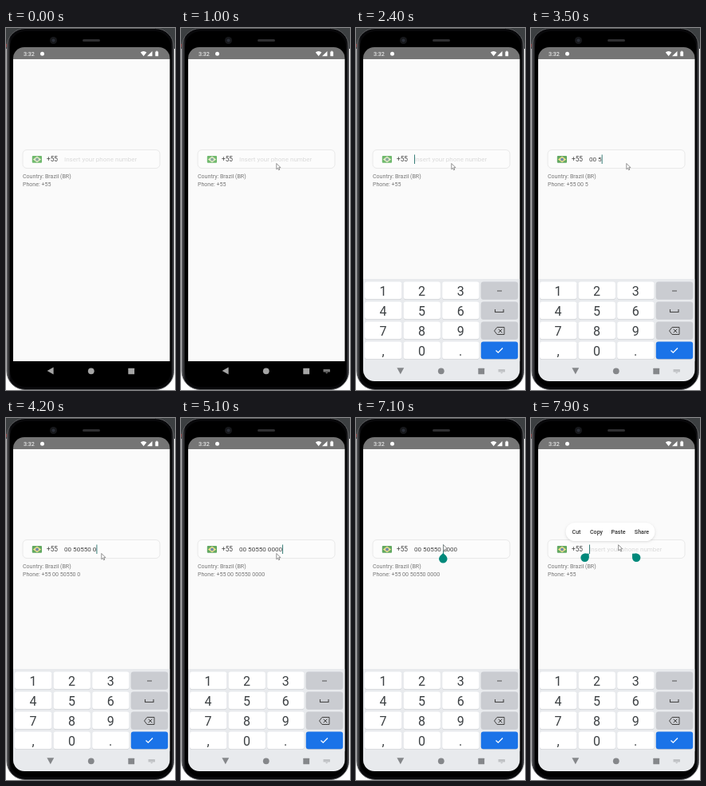
An HTML page with a canvas that plays this animation: 212 by 453 pixels, repeating every 8000 ms.

```html
<!DOCTYPE html>
<html lang="en">
<head>
<meta charset="utf-8">
<title>Phone number input</title>
<style>
  html, body { margin: 0; width: 100%; height: 100%; overflow: hidden; background: #fff; }
  canvas { display: block; width: 212px; height: 453px; }
</style>
</head>
<body>
<canvas id="stage"></canvas>
<script>
const W = 212, H = 453, LOOP = 8000, STEP = 100;
const SCREEN = { left: 9, right: 205.5, top: 24, content: 39, nav: 417, bottom: 442 };
const SCREEN_W = SCREEN.right - SCREEN.left;
const canvas = document.getElementById('stage');
const ctx = canvas.getContext('2d');
const scale = window.devicePixelRatio || 1;
canvas.width = W * scale;
canvas.height = H * scale;

const TEAL = '#00897b', KEYBOARD = '#e8eaed';
const NUMBER = '00 50550 0000';
const DIGIT_TIMES = [2700, 2900, 3300, 3600, 3700, 3900, 4000, 4200, 4300, 4500, 4700];
const CUT_TIME = 7900, SELECT_TIME = 7300, TAP_TIME = 6700;

const progress = (t, from, to) => Math.min(1, Math.max(0, (t - from) / (to - from)));
const ease = p => p * p * (3 - 2 * p);
const mix = (a, b, p) => a + (b - a) * p;

function box(x, y, w, h, fill, radius = 0, stroke) {
  ctx.beginPath();
  ctx.roundRect(x, y, w, h, radius);
  if (fill) { ctx.fillStyle = fill; ctx.fill(); }
  if (stroke) { ctx.strokeStyle = stroke; ctx.lineWidth = 1; ctx.stroke(); }
}

function disc(x, y, r, fill) {
  ctx.beginPath();
  ctx.arc(x, y, r, 0, 7);
  ctx.fillStyle = fill;
  ctx.fill();
}

function trace(points, closed) {
  ctx.beginPath();
  points.forEach(([x, y]) => ctx.lineTo(x, y));
  if (closed) ctx.closePath();
}

function polygon(points, fill) {
  trace(points, true);
  ctx.fillStyle = fill;
  ctx.fill();
}

function line(points, color, width = 1) {
  trace(points);
  ctx.strokeStyle = color;
  ctx.lineWidth = width;
  ctx.stroke();
}

function label(text, x, y, size, color, align = 'left', weight = 400) {
  ctx.font = `${weight} ${size}px Roboto, sans-serif`;
  ctx.textAlign = align;
  ctx.fillStyle = color;
  ctx.fillText(text, x, y);
}

// Typed text grows digit by digit; the mask adds the spaces.
function typedText(t) {
  if (t >= CUT_TIME) return '';
  let left = DIGIT_TIMES.filter(time => t >= time).length;
  let text = '';
  for (const char of NUMBER) {
    if (!left) break;
    text += char;
    if (char !== ' ') left--;
  }
  return text;
}

function drawBody() {
  box(0, 0, W, H, '#fff');
  box(0, 0, W, 26, '#3c3f41');
  box(0, 20, 1.5, 4, '#a33c3c');

  const metal = ctx.createLinearGradient(0.5, 0, 210.5, 0);
  metal.addColorStop(0, '#66676a');
  metal.addColorStop(0.025, '#08080a');
  metal.addColorStop(0.985, '#08080a');
  metal.addColorStop(1, '#4c4d50');
  box(1, 0.5, 209.5, 452, metal, 23, '#5c5d60');
  box(5, 4, 202, 445, '#000', 20);

  disc(59.5, 15.5, 4.5, '#17181b');
  disc(59.5, 15.5, 2, '#2b2f38');
  box(96, 14, 22, 3, '#2e2e30', 1.5);
}

function drawStatusBar() {
  box(SCREEN.left, SCREEN.top, SCREEN_W, SCREEN.content - SCREEN.top, '#757575', [14, 14, 0, 0]);
  label('3:32', 22, 35, 7.2, '#fff');
  disc(45.5, 32.3, 2.5, '#fff');
  polygon([[168.8, 30.5], [170.5, 29.5], [172.5, 29.1], [174.5, 29.5], [176.4, 30.5], [172.6, 35.3]], '#fff');
  polygon([[177, 35.3], [183.5, 35.3], [183.5, 29]], '#fff');
  box(187.3, 29.5, 3.8, 5.8, '#fff', 0.5);
  box(188.3, 28.7, 1.8, 1, '#fff');
}

function drawFlag(t) {
  const vivid = t >= 2900;
  box(32.8, 160, 12.2, 8.8, vivid ? '#62a861' : '#70b96e', 1);
  polygon([[33.8, 164.4], [39, 160.6], [44.2, 164.4], [39, 168.2]], vivid ? '#eadf8c' : '#e4ebc6');
  disc(39, 164.4, 1.9, vivid ? '#6c89b0' : '#86aaa2');
}

function caretVisible(t) {
  if (t < 1400) return false;
  if (t < 2700) return t < 1900 || t >= 2400;
  if (t < TAP_TIME) return t < 5400 || (t >= 5900 && t < 6400);
  return true;
}

function drawField(t) {
  const text = typedText(t);
  box(21, 152.5, 172, 23, '#fcfcfc', 5, '#e9e9e9');
  drawFlag(t);
  label('+55', 51, 167, 8.3, '#444');

  ctx.font = '400 8.1px Roboto, sans-serif';
  const textWidth = ctx.measureText(text).width;
  const selecting = t >= SELECT_TIME;
  if (selecting && text) box(73, 158, textWidth, 12, '#b5dcd8');
  if (text) label(text, 73, 167, 8.1, '#444');
  else label('Insert your phone number', 73, 167, 8, '#dadada');

  if (caretVisible(t) && !(selecting && text)) {
    const x = t >= TAP_TIME && text ? 109 : 73 + textWidth;
    box(x, 158.5, 1, 11.5, '#397f79');
  }

  label('Country: Brazil (BR)', 21, 188, 7.05, '#777');
  label(('Phone: +55 ' + text).trim(), 21, 198, 7.05, '#777');
}

// A drop whose tip points straight up at angle 0.
function drawHandle(x, y, angle) {
  ctx.save();
  ctx.translate(x, y);
  ctx.rotate(angle);
  disc(0, 0, 5.2, TEAL);
  polygon([[0, -7.3], [3.7, -3.7], [0, 0], [-3.7, -3.7]], TEAL);
  ctx.restore();
}

function drawSelectionTools(t) {
  if (t < TAP_TIME) return;
  if (t < SELECT_TIME) return drawHandle(109.3, 176.3, 0);

  drawHandle(67.5, 174.8, Math.PI / 4);
  drawHandle(132.2, 174.8, -Math.PI / 4);

  ctx.save();
  ctx.globalAlpha = progress(t, SELECT_TIME - 100, 7500);
  ctx.shadowColor = 'rgba(0,0,0,.13)';
  ctx.shadowBlur = 3 * scale;
  ctx.shadowOffsetY = scale;
  box(43.5, 131, 112, 23, '#fff', 11.5);
  ctx.shadowColor = 'transparent';
  [['Cut', 57], ['Copy', 82], ['Paste', 109.5], ['Share', 139]]
    .forEach(([text, x]) => label(text, x, 145, 7.1, '#333', 'center', 500));
  ctx.restore();
}

function drawKey(x, y, face, fill) {
  box(x, y + 0.8, 46.3, 21.8, '#cdd0d4', 3);
  box(x, y, 46.3, 21.8, fill, 3);
  if (face) label(face, x + 23, y + 17, 16, '#3c4043', 'center');
}

function drawKeyboard(t) {
  if (t < 1100) return;
  ctx.save();
  ctx.beginPath();
  ctx.rect(SCREEN.left, SCREEN.content, SCREEN_W, SCREEN.nav - SCREEN.content);
  ctx.clip();
  ctx.translate(0, mix(103, 0, ease(progress(t, 1000, 1200))));
  box(SCREEN.left, 314, SCREEN_W, 104, KEYBOARD);
  ['123', '456', '789', ',0.'].forEach((row, r) => {
    const y = 317.5 + r * 25;
    [...row].forEach((face, c) => drawKey(11 + c * 48.6, y, face, '#fff'));
    drawKey(156.8, y, '', r === 3 ? '#1a73e8' : '#caccd1');
  });
  line([[177, 329], [183, 329]], '#555');
  line([[174.5, 352], [174.5, 355.5], [185, 355.5], [185, 352]], '#444', 1.1);
  trace([[173.5, 379], [177, 374.5], [186, 374.5], [186, 383.5], [177, 383.5]], true);
  ctx.lineWidth = 1;
  ctx.stroke();
  line([[178.7, 376.8], [183.3, 381.3]], '#444');
  line([[183.3, 376.8], [178.7, 381.3]], '#444');
  line([[175.5, 403.5], [178.3, 406.2], [184, 400.5]], '#fff', 1.3);
  ctx.restore();
}

function drawNavigation(t) {
  const light = t >= 1100;
  const color = light ? '#85878a' : '#a5a5a5';
  box(SCREEN.left, SCREEN.nav, SCREEN_W, SCREEN.bottom - SCREEN.nav, light ? KEYBOARD : '#000', [0, 0, 14, 14]);

  ctx.save();
  ctx.translate(55.8, 429);
  ctx.rotate(t < 1200 ? Math.PI : mix(0, Math.PI / 2, ease(progress(t, 1200, 1500))));
  polygon([[-3.8, -4.4], [4.2, 0], [-3.8, 4.4]], color);
  ctx.restore();

  disc(106.8, 429.3, 3.9, color);
  box(153.3, 425.7, 7.8, 7.6, color, 0.5);

  if (t >= 1000) {
    const faint = light ? '#c0c2c5' : '#777';
    box(178.5, 427, 8.5, 3.6, faint, 0.6);
    polygon([[181, 431], [184.5, 431], [182.75, 432.6]], faint);
  }
}

function drawPointer(t) {
  if (t < 100) return;
  const arrive = ease(progress(t, 100, 900));
  const move = ease(progress(t, 6300, 6600));
  ctx.save();
  ctx.translate(
    mix(mix(190, 119.8, arrive), 109.6, move),
    mix(mix(266, 169.5, arrive), 158.7, move)
  );
  polygon([[0, 0], [0, 7.2], [1.7, 5.7], [2.8, 8.2], [4, 7.7], [2.9, 5.2], [5.1, 5.1]], '#fff');
  ctx.strokeStyle = '#777';
  ctx.lineWidth = 0.8;
  ctx.stroke();
  ctx.restore();
}

function draw(now) {
  const t = Math.floor((now % LOOP) / STEP) * STEP;
  ctx.setTransform(scale, 0, 0, scale, 0, 0);
  drawBody();
  box(SCREEN.left, SCREEN.content, SCREEN_W, SCREEN.nav - SCREEN.content, '#fafafa');
  drawStatusBar();
  drawField(t);
  drawSelectionTools(t);
  drawKeyboard(t);
  drawNavigation(t);
  drawPointer(t);
}

let start;
function tick(now) {
  start ??= now;
  draw(now - start);
  requestAnimationFrame(tick);
}
requestAnimationFrame(tick);
</script>
</body>
</html>
```
